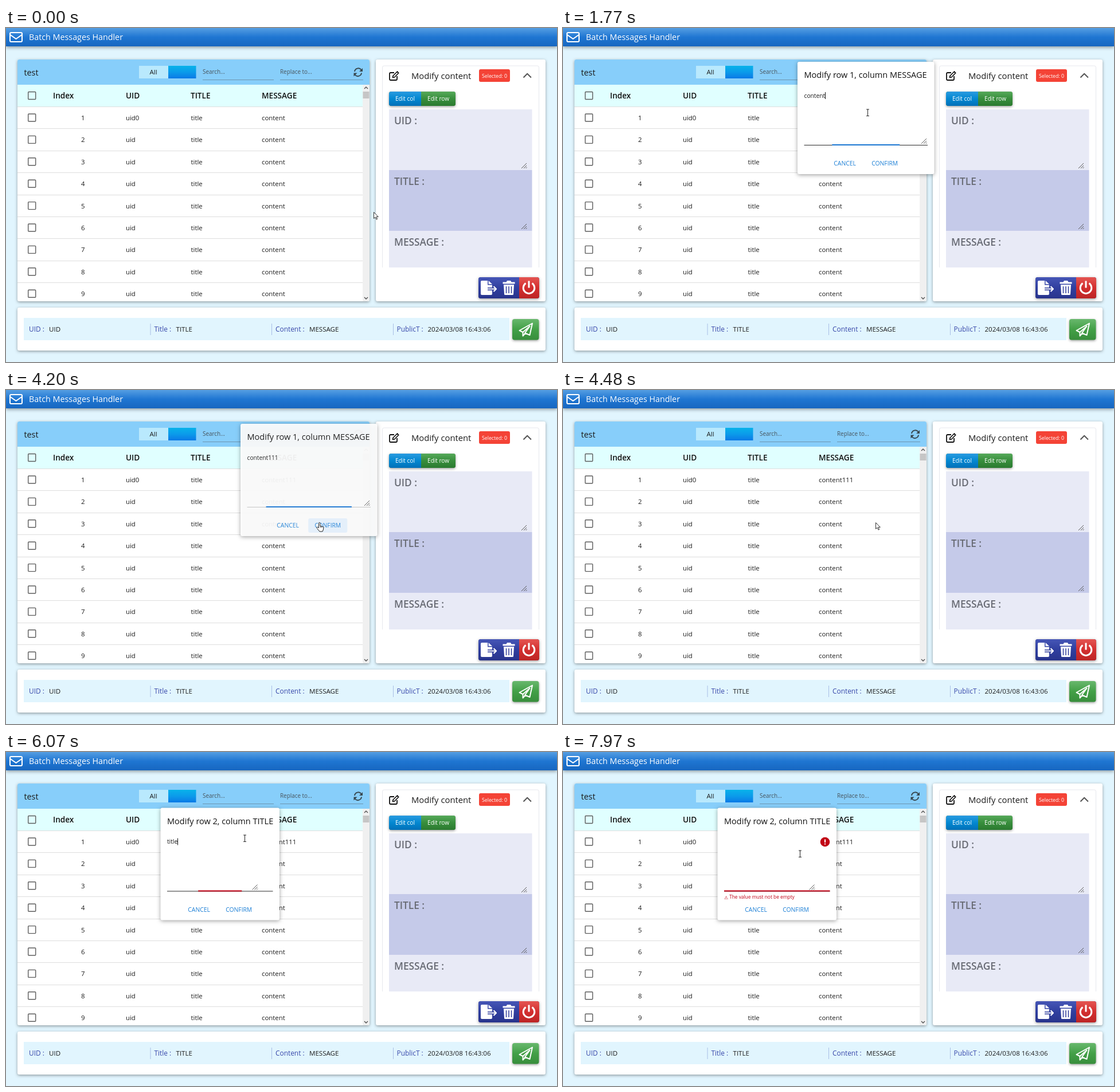
Recreate the animation shown at these times as an HTML page with a canvas. Size 961 by 583 pixels, loop 8000 ms.

```html
<!DOCTYPE html>
<html lang="en">
<head>
<meta charset="utf-8">
<title>Batch Messages Handler</title>
<style>
html, body { margin: 0; width: 100%; height: 100%; overflow: hidden; background: #e1f5fe; }
canvas { display: block; }
</style>
</head>
<body>
<canvas id="stage" width="961" height="583"></canvas>
<script>
const ctx = document.getElementById('stage').getContext('2d');
const LOOP = 8000;
const ROW = 38.4;

// Drawing helpers
function text(str, x, y, size, color = '#1c1c1c', weight = 400, align = 'left') {
  ctx.font = `${weight} ${size}px "Open Sans", "Noto Sans", sans-serif`;
  ctx.textAlign = align;
  ctx.fillStyle = color;
  ctx.fillText(str, x, y + size * 0.35);
}
function rect(x, y, w, h, color) {
  ctx.fillStyle = color;
  ctx.fillRect(x, y, w, h);
}
function round(x, y, w, h, radius, color) {
  ctx.beginPath();
  ctx.roundRect(x, y, w, h, radius);
  ctx.fillStyle = color;
  ctx.fill();
}
function shadowed(blur, draw) {
  ctx.save();
  ctx.shadowColor = 'rgba(0,0,0,.38)';
  ctx.shadowBlur = blur;
  ctx.shadowOffsetY = 1.5;
  draw();
  ctx.restore();
}
const card = (x, y, w, h) => shadowed(5, () => round(x, y, w, h, 3, '#fff'));
function vertical(y, h, ...colors) {
  const g = ctx.createLinearGradient(0, y, 0, y + h);
  colors.forEach((c, i) => g.addColorStop(i / (colors.length - 1), c));
  return g;
}
function fill(d, color) {
  ctx.fillStyle = color;
  ctx.fill(new Path2D(d));
}
function line(d, color, width = 1) {
  ctx.strokeStyle = color;
  ctx.lineWidth = width;
  ctx.stroke(new Path2D(d));
}
function resizeGrip(x, y) {
  line(`M${x - 5} ${y + 4}l9-9M${x - 1} ${y + 4}l5-5M${x + 2.5} ${y + 4}l2-2`, '#555');
}

// Timing helpers
const progress = (t, start, length) => Math.min(1, Math.max(0, (t - start) / length));
function ease(p) { // cubic-bezier(.4, 0, .2, 1)
  let lo = 0, hi = 1, u = p;
  for (let i = 0; i < 18; i++) {
    u = (lo + hi) / 2;
    const x = 1.2 * (1 - u) ** 2 * u + 0.6 * (1 - u) * u * u + u ** 3;
    if (x < p) lo = u; else hi = u;
  }
  return 3 * (1 - u) * u * u + u ** 3;
}

const cursorPath = [
  [0, 641, 321], [390, 641, 321], [950, 472, 163], [1300, 472, 163], [1720, 531, 147],
  [3440, 531, 147], [3950, 546, 231], [4500, 545, 231], [5200, 411, 190], [5450, 411, 190],
  [5950, 416, 150], [6690, 416, 150], [6900, 416, 188], [7600, 416, 188], [7900, 413, 177], [LOOP, 413, 177]
];
function cursorAt(t) {
  const i = cursorPath.findIndex(k => k[0] > t);
  const [t0, x0, y0] = cursorPath[i - 1], [t1, x1, y1] = cursorPath[i];
  const p = (t - t0) / (t1 - t0);
  return { x: x0 + (x1 - x0) * p, y: y0 + (y1 - y0) * p };
}

function header() {
  shadowed(6, () => rect(0, 0, 961, 32, vertical(0, 32, '#559ee2', '#1f76d2', '#1766c0')));
  ctx.lineJoin = 'round';
  line('M9 8h17a2 2 0 0 1 2 2v12a2 2 0 0 1-2 2H9a2 2 0 0 1-2-2V10a2 2 0 0 1 2-2zM7.500 12l10 7 10-7', '#fff', 2.1);
  text('Batch Messages Handler', 40, 16, 14.3, '#fff');
}

function checkbox(y) {
  ctx.strokeStyle = '#5c5c5c';
  ctx.lineWidth = 1.4;
  ctx.beginPath();
  ctx.roundRect(38.7, y - 6.5, 13, 13, 1);
  ctx.stroke();
}

function table(firstMessage, hoverRow) {
  card(20, 55, 614, 422);
  ctx.save();
  ctx.beginPath();
  ctx.roundRect(20, 55, 614, 422, 3);
  ctx.clip();
  rect(20, 55, 614, 44, '#87cefa');
  text('test', 31.5, 77.500, 14.3);
  rect(232, 66, 51, 22, '#b9e9fd');
  rect(283, 66, 48.500, 22, vertical(66, 22, '#08b2ea', '#0b9bea', '#0b79e6'));
  text('All', 250.5, 77, 11.5);
  text('Search...', 343, 77, 9.9, '#48545c');
  text('Replace to...', 478, 77, 9.9, '#48545c');
  line('M343 90.500h124M478 90.500h145', '#6d96b0');
  line('M608 76a6.400 6.400 0 0 1 11.500-3M620 78.500a6.400 6.400 0 0 1-11.500 3', '#37474f', 2);
  fill('M622 70v6h-6zM606.500 84.500v-6h6z', '#37474f');

  rect(20, 99, 602, 38.500, '#e0ffff');
  checkbox(118);
  [['Index', 82], ['UID', 209], ['TITLE', 322], ['MESSAGE', 446]]
    .forEach(([name, x]) => text(name, x, 118.500, 13.6, '#111', 600));
  for (let i = 0; i < 9; i++) {
    const top = 137.5 + i * ROW, y = top + 19.500;
    if (i === hoverRow) rect(20, top, 602, ROW, '#f5f5f5');
    rect(20, Math.round(top - 0.500), 602, 1, '#dedede');
    checkbox(y - 0.500);
    text(i + 1, 137.5, y, 11.4, undefined, 400, 'right');
    text(i ? 'uid' : 'uid0', 209, y, 11.4);
    text('title', 322.5, y, 11.4);
    text(i ? 'content' : firstMessage, 446, y, 11.4);
  }
  rect(622, 99, 12, 378, '#f0f0f0');
  rect(622.5, 111, 11, 12, '#c6c6c6');
  line('M625 106l3-3 3 3M625 470l3 3 3-3', '#505050', 1.4);
  ctx.restore();
}

function sidePanel() {
  card(645, 55, 296, 422);
  line('M656.500 418V69a3 3 0 0 1 3-3h267a3 3 0 0 1 3 3v349', '#e6e8ee');
  line('M677 78h-6a2 2 0 0 0-2 2v9a2 2 0 0 0 2 2h9a2 2 0 0 0 2-2v-5', '#111', 1.8);
  line('M674.500 86.500l.5-3 7.500-7.500 2.200 2.500-7.200 7.500z', '#111', 1.7);
  text('Modify content', 707, 84, 14.8);
  round(825, 72, 54, 22, 3, '#f44336');
  text('Selected: 0', 852, 83.500, 8.8, '#fff', 400, 'center');
  line('M902.500 86.500l6.700-6.700 6.700 6.700', '#555', 2);

  shadowed(4, () => round(668, 111, 116, 25, 4, '#388e3c'));
  round(668, 111, 56, 25, [4, 0, 0, 4], vertical(111, 25, '#2a9be0', '#0288d1', '#0270b8'));
  round(724, 111, 60, 25, [0, 4, 4, 0], vertical(111, 25, '#56a95a', '#388e3c', '#2b7a30'));
  text('Edit col', 696, 123.500, 10.1, '#fff', 400, 'center');
  text('Edit row', 754, 123.500, 10, '#fff', 400, 'center');

  ['UID :', 'TITLE :', 'MESSAGE :'].forEach((label, i) => {
    const y = 142 + i * 106;
    rect(668, y, 249.500, i < 2 ? 106 : 64, i === 1 ? '#c5cae9' : '#e8eaf6');
    text(label, 677, y + 20, 17.3, '#686b74', 600);
    if (i < 2) resizeGrip(904, y + 99);
  });

  const navy = '#2c3a9a';
  shadowed(5, () => round(824, 435, 106, 37, 4, navy));
  round(824, 435, 71, 37, [4, 0, 0, 4], vertical(435, 37, '#4656b6', '#303f9f', '#28348c'));
  round(895, 435, 35, 37, [0, 4, 4, 0], vertical(435, 37, '#e45552', '#d32f2f', '#bd2525'));
  fill('M830 441h10v7.500h8V464a2 2 0 0 1-2 2h-16a2 2 0 0 1-2-2v-21a2 2 0 0 1 2-2zM841.500 441l6.500 6h-6.500z', '#fff');
  line('M840 455.500h14M850 451l5 4.500-5 4.500', navy, 5);
  line('M840 455.500h14M850.500 451l4.500 4.500-4.500 4.500', '#fff', 2.2);
  fill('M866.500 443.500h6l1.500-2.500h6l1.500 2.500h6v3h-21zM868 448h18l-1 16.500a1.500 1.500 0 0 1-1.500 1.500h-13a1.500 1.500 0 0 1-1.500-1.500z', '#fff');
  line('M872.500 451v12M877 451v12M881.500 451v12', navy, 1.5);
  line('M906.500 445.500a9.800 9.800 0 1 0 11 0M912 441.500v12', '#fff', 3);
}

function footer() {
  card(20, 488, 921, 75);
  rect(31, 506, 847, 39, '#e1f5fe');
  [['UID :', 40, 'UID', 75], ['Title :', 258.5, 'TITLE', 296.5],
   ['Content :', 470, 'MESSAGE', 529], ['PublicT :', 681.5, '2024/03/08 16:43:06', 735.5]]
    .forEach(([label, x, value, valueX]) => {
      text(label, x, 525.5, 11.9, '#3949ab');
      text(value, valueX, 525.5, 11.55);
    });
  line('M252 516v20M463.500 516v20M675.500 516v20', '#a9bfe6');
  shadowed(4, () => round(883, 508, 46.500, 36.500, 4, vertical(508, 36, '#69b86d', '#43a047', '#388e3c')));
  line('M918 515.500l-22.500 12.500 6 3 12-10.500-8.500 12 8.500 3.500zM901.500 531v6.500l4-4.500', '#fff', 2);
}

function dialog({ x, y, w, title, value, alpha, caret, hoverField, focus, hoverConfirm, error }) {
  if (alpha <= 0) return;
  const mid = x + w / 2, left = x + 11.5, right = x + w - 11.5;
  ctx.globalAlpha = alpha;
  shadowed(7, () => round(x, y, w, 196, 3, '#fff'));
  text(title, left, y + 23, 14.5, '#111');
  text(value, left, y + 59, 10.25);
  if (caret) rect(Math.round(left + ctx.measureText(value).width), y + 53, 1, 12, '#111');
  rect(left, y + 145, right - left, 1, hoverField ? '#2a2a2a' : '#c2c2c2');
  const half = (right - left) / 2 * focus;
  rect(mid - half, y + 144, half * 2, 2, error ? '#c10015' : '#1976d2');
  resizeGrip(right - 6 - (error ? 25 : 0), y + 139);
  if (hoverConfirm) round(mid - 1, y + 165, 68, 25, 3, '#e2eefa');
  text('CANCEL', mid - 56, y + 177.500, 10.4, '#1e80d6');
  text('CONFIRM', mid + 10, y + 177.500, 10.3, '#1e80d6');
  if (error) {
    ctx.globalAlpha = alpha * error;
    ctx.beginPath();
    ctx.arc(right - 8.500, y + 59.500, 8.300, 0, 7);
    ctx.fillStyle = '#c10015';
    ctx.fill();
    rect(right - 9.500, y + 55, 2, 5.500, '#fff');
    rect(right - 9.500, y + 62, 2, 2, '#fff');
    const messageY = y + 156 - 5 * (1 - error);
    ctx.font = '8px "DejaVu Sans", sans-serif';
    ctx.fillStyle = '#c10015';
    ctx.fillText('⚠', left, messageY + 3);
    text('The value must not be empty', left + 9, messageY, 8.4, '#c10015');
  }
  ctx.globalAlpha = 1;
}

const cursors = {
  arrow() {
    const d = 'M0 0v11l2.600-2.300 1.900 4 1.700-.8-1.900-3.800h3.500z';
    fill(d, '#fff');
    line(d, '#333', 1);
  },
  beam() {
    line('M-2.500-5.500h2l.5.500.5-.5h2M0-5v10.500M-2.500 6h2l.5-.5.5.5h2', '#333', 1.1);
  },
  hand() {
    const d = 'M-1 1a1.200 1.200 0 0 1 2.400 0v5l5 1a1.500 1.500 0 0 1 1 1.500l-.6 4-1.300 3h-5L-4 10a1.200 1.200 0 0 1 1.500-2L-1 9.500z';
    fill(d, '#fff');
    line(d, '#222', 1);
    line('M2 6v3M4.300 6.500V9', '#222', 0.8);
  }
};
function cursor(t, { x, y }) {
  if ((t >= 2520 && t < 3440) || (t >= 6930 && t < 7600)) return;
  const hand = t >= 3850 && t < 4300;
  const beam = (t >= 900 && t < 3750) || t >= 5700;
  ctx.save();
  ctx.translate(Math.round(x) + 0.5, Math.round(y) + 0.5);
  cursors[hand ? 'hand' : beam ? 'beam' : 'arrow']();
  ctx.restore();
}

const keysPressed = (t, times) => times.filter(k => t >= k).length;

function draw(t) {
  const pointer = cursorAt(t);
  const free = (t < 1550) || (t > 4500 && t < 5750);
  const hoverRow = free && pointer.x < 622 ? Math.floor((pointer.y - 137.5) / ROW) : -1;

  rect(0, 0, 961, 583, '#e1f5fe');
  header();
  table(t < 4100 ? 'content' : 'content111', hoverRow);
  sidePanel();
  footer();

  dialog({
    x: 409, y: 59, w: 238.500,
    title: 'Modify row 1, column MESSAGE',
    value: 'content' + '1'.repeat(keysPressed(t, [2520, 2710, 2980])),
    alpha: progress(t, 1380, 270) - progress(t, 4180, 300),
    caret: (t >= 1640 && t < 2180) || (t >= 2520 && t < 3240) || (t >= 3740 && t < 4100),
    hoverField: t >= 1500 && t < 3800,
    focus: ease(progress(t, 1638, 360)) - ease(progress(t, 4101, 360)),
    hoverConfirm: t >= 3850
  });
  dialog({
    x: 269.5, y: 97.500, w: 207.500,
    title: 'Modify row 2, column TITLE',
    value: 'title'.slice(0, 5 - keysPressed(t, [6950, 7030, 7110, 7240, 7440])),
    alpha: progress(t, 5680, 270),
    caret: (t >= 5957 && t < 6500) || (t >= 6950 && t < 7960),
    hoverField: true,
    focus: ease(progress(t, 5957, 360)),
    error: ease(progress(t, 7440, 300))
  });
  cursor(t, pointer);
}

function tick() {
  draw(performance.now() % LOOP);
  requestAnimationFrame(tick);
}
tick();
</script>
</body>
</html>
```
